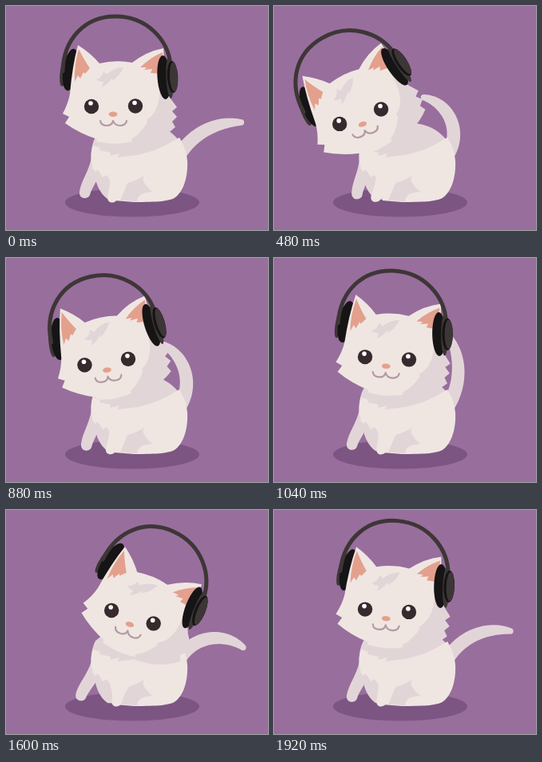
Write an HTML page with a canvas that moves like this. It is 328x281 px and loops after 1960 ms.

```html
<!DOCTYPE html>
<html lang="en">
<head>
<meta charset="utf-8">
<title>Cat with headphones</title>
<style>
html, body { margin: 0; width: 100%; height: 100%; overflow: hidden; background: #986e9d; }
canvas { display: block; width: 328px; height: 281px; }
</style>
</head>
<body>
<canvas id="stage" width="328" height="281"></canvas>
<script>
const ctx = document.getElementById('stage').getContext('2d');
const LOOP = 1960, STEP = 40;
const C = {
  bg: '#986e9d', floor: '#7c5583', fur: '#efe6e2', shade: '#e2d5d8', pink: '#e3a08d',
  eye: '#372a2e', mouth: '#b39aa3', black: '#161415', gray: '#3d3636'
};

// time, face turn, head turn, head x, y, phones turn, phones x, y, tail tip heading
const KEYS = [
  [0, 0, 0, 134.5, 125.5, 0, 139, 84, 4],
  [240, -16, -21, 112.5, 136, -25, 104, 96.5, -117],
  [500, -19, -25, 108, 138.5, -30, 97, 101, -172],
  [720, -17, -23, 111.5, 136.5, -27, 102, 98.5, -173],
  [1040, 4, 4, 141.5, 125.5, 3, 148, 87, -120],
  [1280, 17.3, 22.5, 157.5, 133, 23, 179.5, 91.5, -8],
  [1440, 18.7, 25.5, 160, 134.5, 26.5, 184, 93.5, 26],
  [1600, 17.8, 24, 158.5, 134, 25, 182, 92.5, 40],
  [1920, 4, 4.5, 141.5, 126, 5.3, 150.5, 84.5, 12]
];

const shape = d => new Path2D(d);
const P = {
  back: shape('M112 164C105 178 106 192 110 203C111 221 117 235 127 242L150 244L223 186C221 167 202 149 175 147L130 150Z'),
  body: shape('M109 175C105 185 106 195 109 203L107 202L112 208L115 205L121 215L126 212L130 218L136 244L160 246C190 246 205 245 212 240C224 231 228 210 227 194C226 182 222 173 217 165C200 175 188 182 164 187L139 190L142 185L130 188L131 184L117 181L118 178Z'),
  belly: shape('M143 244L152 222Q164 219 174 212Q169 217 174 223Q178 230 184 233Q171 234 167 238Q164 241 164 245Z'),
  sideLeg: shape('M107 190C104 207 94 219 92 233C91 243 103 243 105 237C107 229 114 220 117 211L118 192Z'),
  frontLeg: shape('M128 202C133 216 129 230 127 240C127 249 138 248 140 241C144 229 153 224 155 213L150 196Z'),
  cheek: shape('M180 75L198 100L206 116L214 127L208 132L214 139L208 145L212 152Q188 174 150 174L150 100Z'),
  head: shape('M90 49Q106 59 117 72Q138 67 158 71Q176 57 197 53Q200 75 192 97Q194 118 187 131Q184 137 176 143L177 146Q168 161 157 167L158 170Q140 174 126 172L113 170L114 167Q92 160 74 147L79 139L71 135Q78 122 80 110Q83 75 90 49Z'),
  earL: shape('M91 54Q85 74 86 95L90 87L93 91L97 83L99 85L105 78Q98 68 91 54Z'),
  earR: shape('M196 58Q180 65 168 77L176 77L173 80L183 79L181 84L194 85Z'),
  tuft: shape('M112 92Q119 92 122 82L126 86Q136 77 147 77Q143 87 133 94L133 90Q128 98 120 102L122 95Q117 96 112 92Z'),
  smile: shape('M118 144Q119 150 126 150Q133 150 134 144Q136 150 143 150Q150 150 151 144'),
  band: shape('M71 82C72 40 100 13 137 13C176 13 203 42 206 74')
};

function fill(path, color) {
  ctx.fillStyle = color;
  ctx.fill(path);
}

function oval(x, y, rx, ry, color, turn = 0) {
  ctx.fillStyle = color;
  ctx.beginPath();
  ctx.ellipse(x, y, rx, ry, turn * Math.PI / 180, 0, 2 * Math.PI);
  ctx.fill();
}

function line(path, color, width) {
  ctx.strokeStyle = color;
  ctx.lineWidth = width;
  ctx.lineCap = ctx.lineJoin = 'round';
  ctx.stroke(path);
}

// Draw with the rest point (ox, oy) moved to (x, y) and turned.
function posed(ox, oy, x, y, turn, draw) {
  ctx.save();
  ctx.translate(x, y);
  ctx.rotate(turn * Math.PI / 180);
  ctx.translate(-ox, -oy);
  draw();
  ctx.restore();
}

// Smooth cyclic curve through the keys.
function pose(t) {
  const n = KEYS.length;
  const key = (i, k) => {
    const turn = Math.floor(i / n), row = KEYS[i - turn * n];
    return k ? row[k] : row[0] + turn * LOOP;
  };
  const slope = (i, k) =>
    (key(i + 1, k) - key(i - 1, k)) / (key(i + 1, 0) - key(i - 1, 0));
  let i = n - 1;
  while (KEYS[i][0] > t) i--;
  const span = key(i + 1, 0) - key(i, 0);
  const u = (t - key(i, 0)) / span, w = 1 - u;
  return KEYS[0].map((_, k) =>
    key(i, k) * w * w * (1 + 2 * u) + key(i + 1, k) * u * u * (3 - 2 * u) +
    span * u * w * (slope(i, k) * w - slope(i + 1, k) * u));
}

function drawTail(end) {
  const N = 36, len = 92, start = -58;
  let x = 217, y = 187;
  const left = [], right = [];
  let tip;
  for (let i = 0; i <= N; i++) {
    const u = i / N, h = (start + (end - start) * u) * Math.PI / 180;
    const r = 8.5 - 0.6 * u - 4.2 * u ** 4;
    left.push([x + r * Math.sin(h), y - r * Math.cos(h)]);
    right.unshift([x - r * Math.sin(h), y + r * Math.cos(h)]);
    tip = [x, y, r];
    x += Math.cos(h) * len / N;
    y += Math.sin(h) * len / N;
  }
  ctx.fillStyle = C.shade;
  ctx.beginPath();
  left.concat(right).forEach(p => ctx.lineTo(...p));
  ctx.fill();
  oval(tip[0], tip[1], tip[2], tip[2], C.shade);
}

function drawBody(sway) {
  posed(112, 190, 112, 190, 6 * sway, () => fill(P.sideLeg, C.shade));
  fill(P.back, C.shade);
  fill(P.body, C.fur);
  fill(P.belly, C.shade);
  posed(135, 195, 135, 195, -6.5 * sway, () => fill(P.frontLeg, C.fur));
}

function drawHead() {
  fill(P.cheek, C.shade);
  fill(P.head, C.fur);
  fill(P.earL, C.pink);
  fill(P.earR, C.pink);
  fill(P.tuft, C.shade);
}

function drawFace(turn) {
  // The glint stays upright while the face turns.
  for (const [x, y] of [[107, 126], [162, 125.5]]) {
    posed(0, 0, x, y, -turn, () => {
      oval(0, 0, 9.2, 9.2, C.eye);
      oval(-1, -4, 2.8, 2.8, '#fff');
    });
  }
  oval(134, 135.7, 5.4, 3.2, C.pink);
  line(P.smile, C.mouth, 2.2);
}

function drawLeftCup() {
  oval(73, 81, 5, 20, C.gray, 9);
  oval(81, 80, 9.5, 26.5, C.black, 9);
}

function drawRightCup() {
  oval(198, 89.5, 8.5, 27.5, C.black, -4);
  oval(205, 90, 4.5, 26, C.gray, -3);
  line(P.band, C.gray, 5);
  oval(208.5, 89, 6.8, 20, C.black, -3);
  oval(210, 89, 5, 18.5, C.gray, -3);
}

function draw(t) {
  const [, face, head, hx, hy, phones, px, py, tail] = pose(t);
  const withHead = (turn, part) => posed(134.5, 125.5, hx, hy, turn, part);
  const withPhones = part => posed(139, 84, px, py, phones, part);
  ctx.fillStyle = C.bg;
  ctx.fillRect(0, 0, 328, 281);
  oval(158, 246.5, 84, 18, C.floor);
  drawTail(tail);
  drawBody(face / 17);
  withPhones(drawLeftCup);
  withHead(head, drawHead);
  withHead(face, () => drawFace(face));
  withPhones(drawRightCup);
}

const began = performance.now();
function tick() {
  const t = (performance.now() - began) % LOOP;
  draw(Math.floor(t / STEP) * STEP);
  requestAnimationFrame(tick);
}
tick();
</script>
</body>
</html>
```
